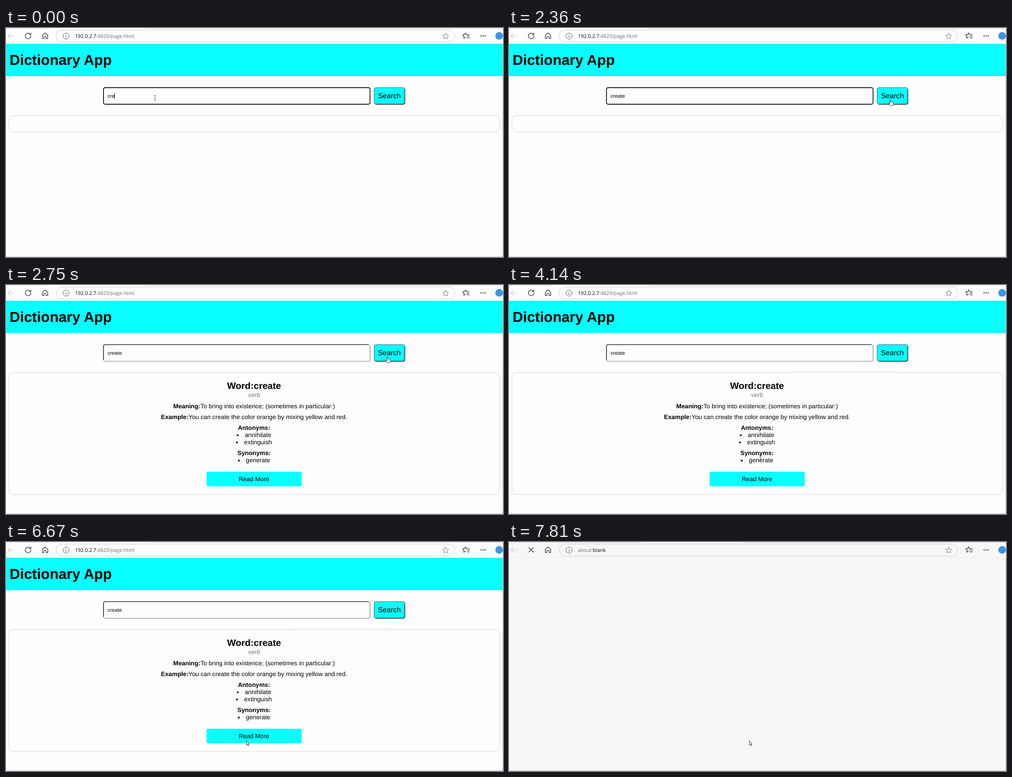
Write an HTML page that moves like this. It is 1101 by 509 pixels and loops after 8 s.

```html
<!DOCTYPE html>
<html lang="en">
<head>
<meta charset="utf-8">
<title>Dictionary App</title>
<style>
  html, body { margin: 0; width: 100%; height: 100%; overflow: hidden; background: #fefefe; }
  svg { display: block; font: 13.71px "Liberation Sans", Arial, sans-serif; text-rendering: geometricPrecision; }
  .mid { text-anchor: middle; }
  .bold { font-weight: bold; }
  .url { font: 11.1px "Open Sans", "Noto Sans", sans-serif; }
  .soft { fill: #6c6c6c; }
  .icon { fill: none; stroke: #222; stroke-width: 1.2; stroke-linejoin: round; stroke-linecap: round; }
  .aqua { fill: #08feff; }
  .card { fill: none; stroke: #e8e8e8; stroke-width: 2; }
  .pointer { fill: #fff; stroke: #222; stroke-width: .9; stroke-linejoin: round; }
</style>
</head>
<body>
<svg width="1101" height="509" viewBox="0 0 1101 509">
  <rect id="backdrop" width="1101" height="509"/>

  <g id="page">
    <rect class="aqua" y="35" width="1101" height="72"/>
    <text class="bold" x="8" y="82" font-size="32">Dictionary App</text>

    <g fill="none">
      <g id="blurred">
        <rect x="216" y="132.5" width="590.5" height="37" rx="4" stroke="#777" stroke-width="1.2"/>
        <path d="M216 166V136.500Q216 132.500 220 132.500H803" stroke="#222" stroke-width="1.4"/>
      </g>
      <rect id="focused" x="216" y="132.500" width="590.5" height="37" rx="4" stroke="#111" stroke-width="1.8"/>
    </g>
    <text id="query" x="225" y="154.500" font-size="11.43"></text>
    <rect id="caret" y="144" width="1" height="13"/>

    <rect class="aqua" x="815.5" y="132.500" width="68" height="37" rx="4" stroke="#557" stroke-width="1"/>
    <path d="M883.500 136V165.500Q883.500 169.500 879.500 169.500H819" fill="none" stroke="#111" stroke-width="1.3"/>
    <text class="mid" x="849.3" y="156" font-size="16">Search</text>

    <rect id="card" class="card" x="6.7" y="194.7" width="1086.300" rx="8"/>
    <path id="trace" d="M632 191.500H852" stroke="#ececec" stroke-width="1.5"/>

    <g id="result">
      <text class="mid bold" x="549.5" y="231.3" font-size="20.57">Word:create</text>
      <text class="mid" x="549.8" y="249" font-style="italic" fill="#777">verb</text>
      <text class="mid" x="549.5" y="273.500"><tspan class="bold">Meaning:</tspan>To bring into existence; (sometimes in particular:)</text>
      <text class="mid" x="549.5" y="297.700"><tspan class="bold">Example:</tspan>You can create the color orange by mixing yellow and red.</text>
      <text class="mid bold" x="549.5" y="322">Antonyms:</text>
      <text x="529" y="338">annihilate</text>
      <text x="527.5" y="354">extinguish</text>
      <text class="mid bold" x="549.5" y="378.300">Synonyms:</text>
      <text x="531.3" y="394.300">generate</text>
      <circle cx="513.3" cy="334" r="2.1"/>
      <circle cx="511.500" cy="350" r="2.1"/>
      <circle cx="515.7" cy="390.300" r="2.1"/>
      <rect class="aqua" x="444.5" y="415" width="210.500" height="32.500" rx="3.500"/>
      <text class="mid" x="549.3" y="436">Read More</text>
    </g>
  </g>

  <!-- browser toolbar -->
  <path id="tabs" stroke="#d2d2d2"/>
  <path id="divider" d="M0 34.500H1101" stroke="#ebebeb"/>
  <rect x="111" y="4.500" width="883.500" height="26.500" rx="13.200" fill="none" stroke="#cbcbcb"/>
  <g class="icon">
    <path d="M18 17.500H4.500M10 12 4.500 17.500 10 23" stroke="#c8c8c8"/>
    <path id="reload" d="M54.600 15A6.200 6.200 0 1 0 55.200 17.500M55 10.800V15H50.800"/>
    <path id="stop" d="M44 12.500 54 22.500M54 12.500 44 22.500"/>
    <path d="M80.500 16.500 86.500 11 92.500 16.500V23.300H88.700V18.500H84.300V23.300H80.500Z"/>
    <circle cx="133" cy="18" r="6.700" stroke="#555" stroke-width="1"/>
    <path d="M133 17.300V21.300M133 14.800V14.900" stroke="#555"/>
    <path transform="translate(974 18.500)" d="M0-7 2-2.600 6.700-2.200 3.100 1 4.200 5.700 0 3.200-4.200 5.700-3.100 1-6.700-2.200-2-2.600Z" stroke="#777" stroke-width="1"/>
    <path d="M1020 14.700 1018 10.700 1015.900 14.700 1011.700 15.300 1014.700 18.300 1014 22.800 1018 20.700M1020.500 15.200H1026.500M1020.500 18.500H1026.500M1021.500 21.800H1026.500"/>
  </g>
  <g fill="#222">
    <circle cx="1052.500" cy="17.500" r="1.300"/>
    <circle cx="1057" cy="17.500" r="1.300"/>
    <circle cx="1061.500" cy="17.500" r="1.300"/>
  </g>
  <circle cx="1092.500" cy="17.500" r="8.500" fill="#3a96e4"/>
  <text id="address" class="url" x="153" y="22">192.0.2.7<tspan class="soft">:4820/page.html</tspan></text>
  <text id="blank" class="url" x="152.500" y="22"><tspan class="soft">about:</tspan>blank</text>
  <path d="M1100.500 35V508.500H0" fill="none" stroke="#bdbdbd"/>

  <path id="beam" d="M-2.500-5H-.6L0-4.500.6-5H2.500M0-4.500V4.500M-2.500 5H-.6L0 4.500.6 5H2.500" fill="none" stroke="#444" stroke-width=".9"/>
  <path id="arrow" class="pointer" d="M.5.5V10.700L2.800 8.600 4.300 12.100 5.700 11.400 4.300 8.200H6.900Z"/>
  <path id="hand" class="pointer" d="M-1 1Q0-.5 1 1V5.500Q2 4.600 3 5.800 4.200 5.200 5 6.400 6.500 6 6.600 7.600V10.500Q6.400 12 5.400 13.800H0Q-1 11.500-3.200 9-4 7.200-2.600 7.200L-1 8.600Z"/>
</svg>
<script>
const LOOP = 8000;
const $ = id => document.getElementById(id);
const show = (id, on) => { $(id).style.display = on ? '' : 'none'; };

const pointer = [
  [0, 'beam', 330, 155], [990, 'beam', 337, 156], [1110, 'beam', 356.5, 158],
  [1260, 'beam', 400, 164], [1390, 'arrow', 455, 172], [1520, 'arrow', 496, 175],
  [1790, 'arrow', 676, 174], [1940, 'beam', 757.5, 167], [2080, 'hand', 826, 157],
  [2210, 'hand', 844, 157], [2360, 'hand', 845, 159], [3880, 'arrow', 790, 215],
  [4010, 'arrow', 632, 310], [4140, 'beam', 557, 382], [4570, 'arrow', 551, 397],
  [4700, 'hand', 544, 421], [4830, 'hand', 537, 437], [4950, 'hand', 532, 443],
  [5240, 'hand', 532, 441], [6670, 'arrow', 532, 441]
];
const typing = [[0, 'cre'], [160, 'crea'], [290, 'creat'], [420, 'create']];
const at = (steps, t) => steps.findLast(step => step[0] <= t);

function draw(t) {
  const leaving = t >= 7680, found = t >= 2750, focus = t < 2620;

  show('page', !leaving);
  show('address', !leaving);
  show('reload', !leaving);
  for (const id of ['blank', 'stop', 'divider']) show(id, leaving);
  $('backdrop').setAttribute('fill', leaving ? '#f7f7f7' : '#fefefe');
  const [from, to] = t < 7680 ? [94, 311] : t < 7810 ? [298, 312] : [298, 516];
  $('tabs').setAttribute('d', `M0 .5H${from}M${to} .5H1101`);

  show('focused', focus);
  show('blurred', !focus);
  show('result', found);
  show('trace', t >= 4010);
  $('card').setAttribute('height', found ? 270.8 : 36.3);

  const query = $('query');
  query.textContent = at(typing, t)[1];
  show('caret', t < 990 || (t >= 1520 && t < 2080));
  if (!leaving) $('caret').setAttribute('x', Math.floor(225 + query.getComputedTextLength()));

  const [, shape, x, y] = at(pointer, t);
  for (const id of ['beam', 'arrow', 'hand']) show(id, id === shape);
  $(shape).setAttribute('transform', `translate(${x} ${y})`);
}

const start = performance.now();
function tick() {
  draw((performance.now() - start) % LOOP);
  requestAnimationFrame(tick);
}
tick();
</script>
</body>
</html>
```
